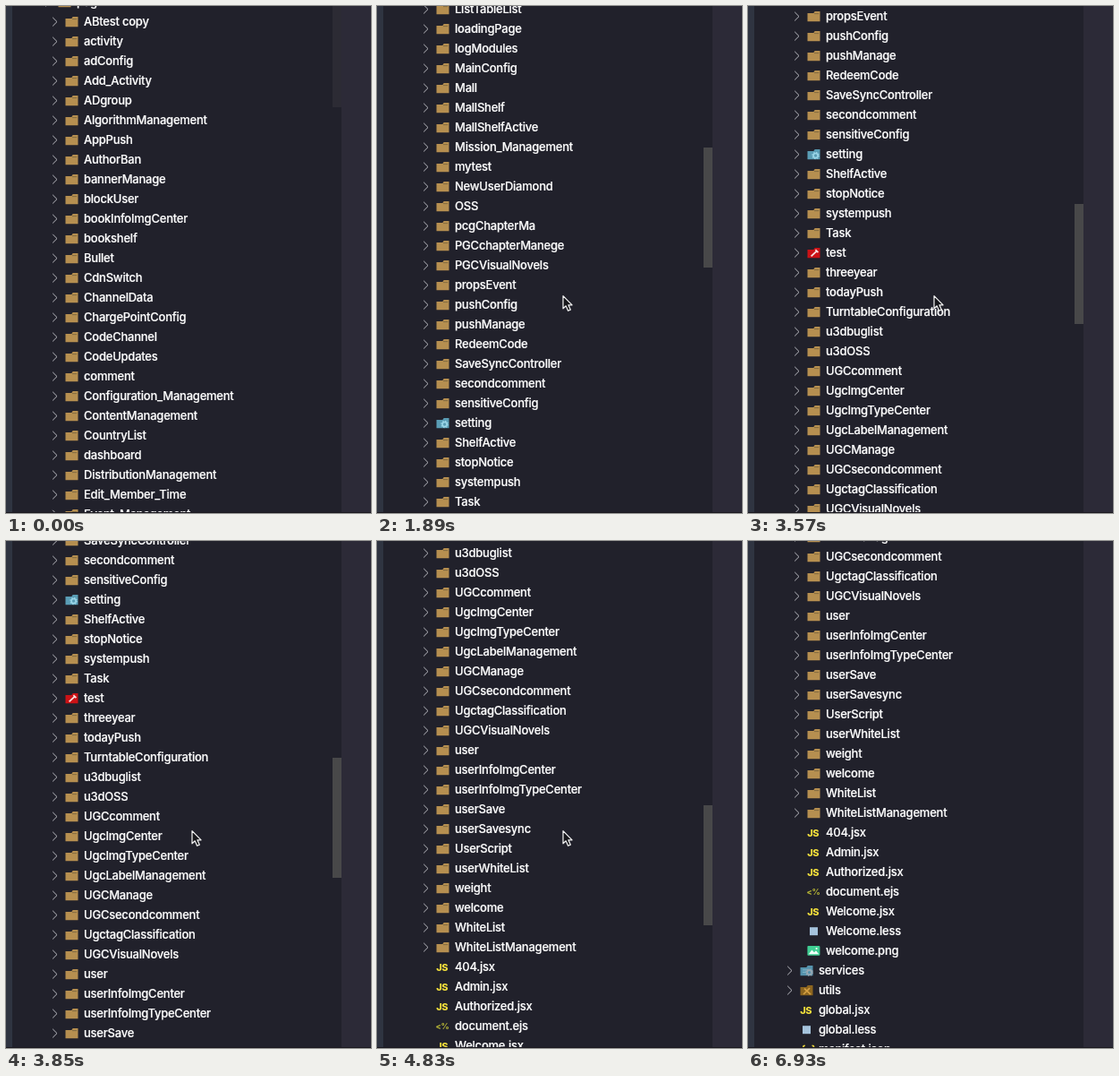
An HTML page for the animation above (7350 ms loop, 408 by 566 pixels).

```html
<!DOCTYPE html>
<html lang="en">
<head>
<meta charset="utf-8">
<title>File tree</title>
<style>
  html, body { margin: 0; width: 100%; height: 100%; overflow: hidden; background: #21212b; }
  svg { display: block; width: 408px; height: 566px; }
  .label {
    font: 500 13px Inter, Roboto, sans-serif; letter-spacing: -.23px;
    fill: #fff; stroke: #fff; stroke-width: .2;
  }
  .badge { font: 800 11px Inter, sans-serif; letter-spacing: -.4px; }
  .chevron { fill: none; stroke: #b9bac0; stroke-width: 1; }
</style>
</head>
<body>
<svg viewBox="0 0 408 566">
  <defs>
    <path id="folder" d="M-.5 1.8h6.8l1.4-2h5.8v11.2h-14z"/>
    <g id="gear">
      <circle r="2.5" fill="none" stroke-width="1.6"/>
      <circle r="3.6" fill="none" stroke-width="1.3" stroke-dasharray="1.4 1.43"/>
    </g>
    <g id="icon-folder">
      <use href="#folder" fill="#b68f50"/>
      <path d="M7 2.4h5.2" stroke="#7d6740" stroke-width=".9"/>
    </g>
    <g id="icon-setting">
      <use href="#folder" fill="#5a9db5"/>
      <use href="#gear" x="8.6" y="6.8" stroke="#9bd6e8"/>
    </g>
    <g id="icon-test">
      <use href="#folder" fill="#cb1216"/>
      <path d="M3.6 9.2L10 3.2M8.4 2l3 3" stroke="#f8dede" stroke-width="1.8"/>
    </g>
    <g id="icon-services">
      <use href="#folder" fill="#5593ad"/>
      <path d="M2 4.6h5M2 7.2h4" stroke="#82b8cb"/>
      <use href="#gear" x="9.6" y="7.4" stroke="#99a9b4"/>
    </g>
    <g id="icon-utils">
      <use href="#folder" fill="#8c651f"/>
      <path d="M3 9.8L10 3M4 3.5l7 6.5" stroke="#d5a043" stroke-width="1.7"/>
    </g>
    <g id="icon-image">
      <rect x="-.6" y="-.2" width="14" height="10.8" rx="1" fill="#3fce93"/>
      <path d="M.8 9l3.6-4.8L7 7l2-2 3.2 4z" fill="#f2fff9"/>
      <circle cx="9.6" cy="2.8" r="1.1" fill="#f2fff9"/>
    </g>
    <g id="icon-style"><rect x="2" y="1" width="9" height="9" fill="#a5c3dc"/></g>
    <g id="icon-script"><text class="badge" x="-.8" y="9.3" fill="#f1de3b">JS</text></g>
    <g id="icon-template"><text class="badge" x="-1.4" y="8.6" fill="#b4b335" style="font-size:9px">&lt;%</text></g>
    <g id="icon-data"><text class="badge" x="0" y="9" fill="#e5cf3a">{..}</text></g>
  </defs>
  <rect width="408" height="566" fill="#21212b"/>
  <rect width="7" height="566" fill="#2f3441"/>
  <rect x="375" width="33" height="566" fill="#2c2a37"/>
  <g id="tree"></g>
  <rect id="thumb" x="365" width="10" height="134"/>
  <path id="pointer" d="M208 323.6v14.2l3.2-3 2.4 5.5 2.7-1.2-2.4-5.3h4.2z"
        fill="#17171b" stroke="#f4f4f4" stroke-width="1.2" stroke-linejoin="round"/>
  <rect y="565" width="408" height="1" fill="#1a181f"/>
</svg>
<script>
const LOOP = 7350, ROW = 22;
const ACTIVE_FROM = 1680, ACTIVE_TO = 6580, THUMB_GONE = 6930;

const folders = `ABtest copy|activity|adConfig|Add_Activity|ADgroup|AlgorithmManagement|AppPush
AuthorBan|bannerManage|blockUser|bookInfoImgCenter|bookshelf|Bullet|CdnSwitch|ChannelData
ChargePointConfig|CodeChannel|CodeUpdates|comment|Configuration_Management|ContentManagement
CountryList|dashboard|DistributionManagement|Edit_Member_Time|Event_Management|feedback
FeedbackList|gift|giftConfig|home|HotSearch|ImgCenter|InviteCode|LabelManage|language
levelConfig|ListTable|ListTableList|loadingPage|logModules|MainConfig|Mall|MallShelf
MallShelfActive|Mission_Management|mytest|NewUserDiamond|OSS|pcgChapterMa|PGCchapterManege
PGCVisualNovels|propsEvent|pushConfig|pushManage|RedeemCode|SaveSyncController|secondcomment
sensitiveConfig|setting|ShelfActive|stopNotice|systempush|Task|test|threeyear|todayPush
TurntableConfiguration|u3dbuglist|u3dOSS|UGCcomment|UgcImgCenter|UgcImgTypeCenter
UgcLabelManagement|UGCManage|UGCsecondcomment|UgctagClassification|UGCVisualNovels|user
userInfoImgCenter|userInfoImgTypeCenter|userSave|userSavesync|UserScript|userWhiteList|weight
welcome|WhiteList|WhiteListManagement`.split(/[|\n]/);
const files = ["404.jsx", "Admin.jsx", "Authorized.jsx", "document.ejs",
  "Welcome.jsx", "Welcome.less", "welcome.png"];
const outer = ["services", "utils", "global.jsx", "global.less", "manifest.json"];

const iconByExtension = { jsx: "script", ejs: "template", less: "style", png: "image", json: "data" };
const specialFolders = ["setting", "test", "services", "utils"];

// Start time and scroll offset of each wheel step
const scrollSteps = [
  [0, 0], [1680, 250], [1750, 500], [1820, 700], [1890, 850],
  [2520, 900], [2660, 950], [2870, 1000], [3010, 1050], [3150, 1100],
  [3570, 1150], [3640, 1175], [3710, 1200], [3850, 1250],
  [3990, 1300], [4060, 1350], [4620, 1400], [4690, 1450], [4830, 1500],
  [4970, 1550], [5250, 1600], [5740, 1650]
];

function rowMarkup(name, index, indent) {
  const extension = name.split(".")[1];
  const icon = extension ? iconByExtension[extension]
    : specialFolders.includes(name) ? name : "folder";
  const chevron = extension ? "" : '<path class="chevron" d="M52.2 12.8l4.8 4.8-4.8 4.8"/>';
  return `<g transform="translate(${indent} ${index * ROW})">${chevron}
    <use href="#icon-${icon}" x="67" y="12.2"/><text class="label" x="87" y="22">${name}</text></g>`;
}

const tree = document.getElementById("tree");
const thumb = document.getElementById("thumb");
const pointer = document.getElementById("pointer");
const inner = [...folders, ...files];
tree.innerHTML = rowMarkup("pages", -1, -8)
  + inner.map((name, i) => rowMarkup(name, i, 0)).join("")
  + outer.map((name, i) => rowMarkup(name, inner.length + i, -8)).join("");

function render(time) {
  const scroll = scrollSteps.findLast(([start]) => start <= time)[1];
  const active = time >= ACTIVE_FROM && time < ACTIVE_TO;
  tree.setAttribute("transform", `translate(0 ${-scroll})`);
  thumb.setAttribute("y", Math.round(-21 + scroll * 0.2105));
  thumb.setAttribute("fill", active ? "#484849" : "#2c2b34");
  thumb.setAttribute("visibility", time < THUMB_GONE ? "visible" : "hidden");
  pointer.setAttribute("visibility", active ? "visible" : "hidden");
}

const started = performance.now();
function tick() {
  render((performance.now() - started) % LOOP);
  requestAnimationFrame(tick);
}
tick();
</script>
</body>
</html>
```
